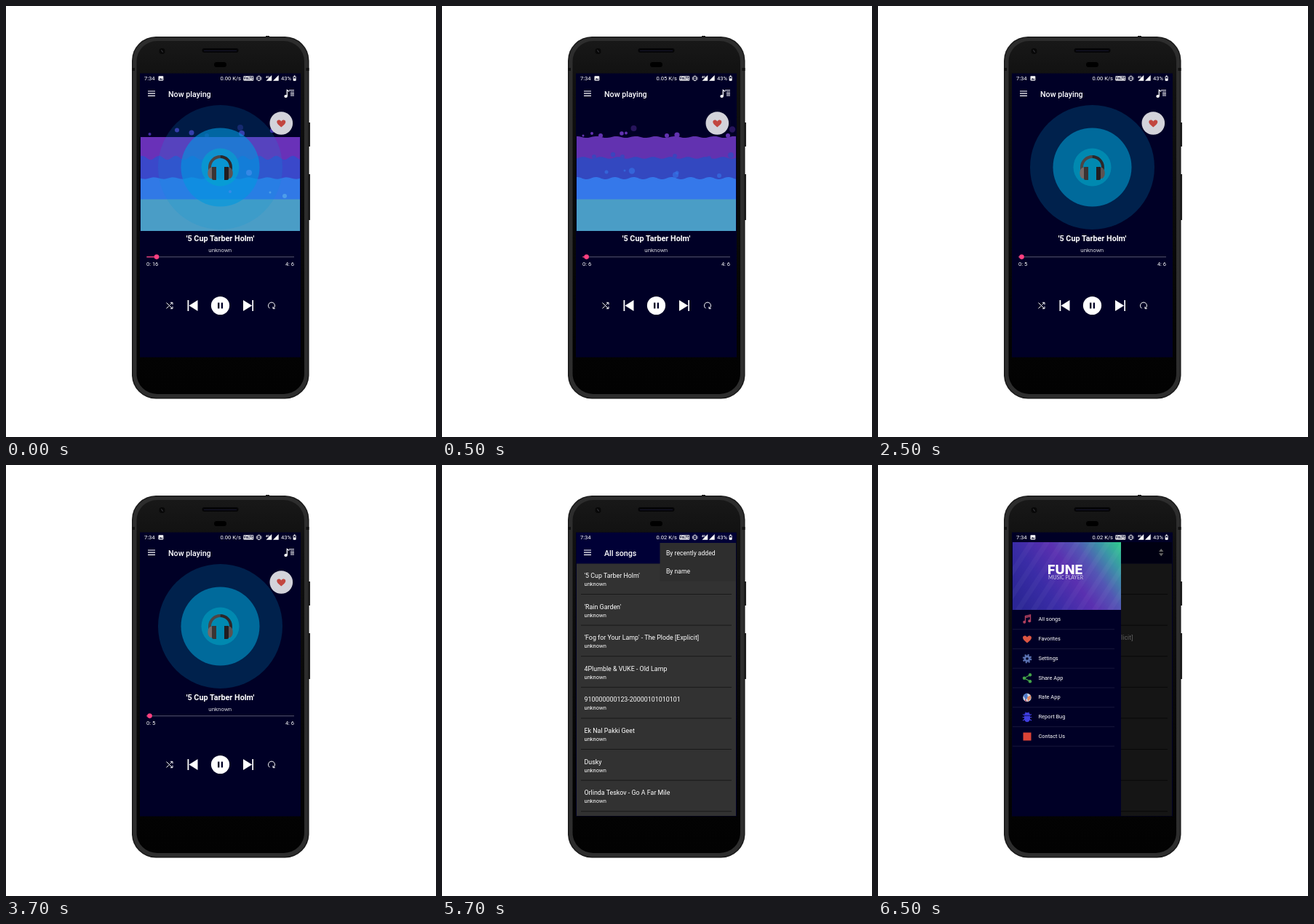
Recreate the animation shown at these times as an HTML page. Size 591 by 592 pixels, loop 8 s.

```html
<!DOCTYPE html>
<html lang="en">
<head>
<meta charset="utf-8">
<title>Music player</title>
<style>
html, body { margin: 0; width: 100%; height: 100%; overflow: hidden; background: #fff; }
svg { display: block; width: 100vw; height: 100vh; }
text { font-family: Roboto, "Open Sans", sans-serif; fill: #fff; }
.status { font-size: 7.6px; }
.bar { font-size: 10.7px; font-weight: 500; }
.song { font-size: 8.9px; }
.sub { font-size: 7.5px; }
.menu { font-size: 8.6px; }
.item { font-size: 7.45px; }
.mid { text-anchor: middle; }
.end { text-anchor: end; }
.line { fill: none; stroke: #fff; }

/* hard cuts between the screens */
.cut { animation: 8s step-end infinite; }
.ghost { animation-name: ghost; }
.waves { animation-name: waves; }
.rings { animation-name: rings; }
.player { animation-name: player; }
.blend { animation-name: blend; }
.list { animation-name: list; }
.drawer { animation-name: drawer; }
.photo { animation-name: photo; }
.browse { animation-name: browse; }
@keyframes ghost { 0% { opacity: 1 } 6.25%, 100% { opacity: 0 } }
@keyframes waves { 0% { opacity: 0 } 6.25% { opacity: 1 } 31.25%, 100% { opacity: 0 } }
@keyframes rings { 0% { opacity: 0 } 31.25% { opacity: 1 } 56.25%, 100% { opacity: 0 } }
@keyframes blend { 0% { opacity: 1 } 6.25% { opacity: 0 } 31.25% { opacity: 1 } 56.25%, 100% { opacity: 0 } }
@keyframes player { 0% { opacity: 1 } 56.25%, 100% { opacity: 0 } }
@keyframes list { 0% { opacity: 0 } 56.25% { opacity: 1 } 81.25%, 100% { opacity: 0 } }
@keyframes drawer { 0% { opacity: 0 } 81.25%, 100% { opacity: 1 } }
@keyframes browse { 0% { opacity: 0 } 56.25%, 100% { opacity: 1 } }
@keyframes photo { 0% { opacity: 1 } 56.25% { opacity: 0 } 81.25%, 100% { opacity: 1 } }
</style>
</head>
<body>
<svg viewBox="0 0 591 592" preserveAspectRatio="none">
  <defs>
    <linearGradient id="bezel" x2="0" y2="1">
      <stop stop-color="#181818"/><stop offset=".12" stop-color="#101010"/>
      <stop offset=".85" stop-color="#030303"/><stop offset="1" stop-color="#020202"/>
    </linearGradient>
    <linearGradient id="cover" gradientUnits="userSpaceOnUse" x1="200" y1="199" x2="334" y2="106">
      <stop stop-color="#2b2695"/><stop offset=".25" stop-color="#3a2ca6"/>
      <stop offset=".5" stop-color="#5a30b0"/><stop offset=".68" stop-color="#5356b4"/>
      <stop offset=".84" stop-color="#3c93a8"/><stop offset="1" stop-color="#2fcd8c"/>
    </linearGradient>
    <clipPath id="screen"><path d="M185 93h219v389h-219z"/></clipPath>
    <clipPath id="art"><path d="M185 135h219v174h-219z"/></clipPath>
    <clipPath id="head"><path d="M185 106h149v93h-149z"/></clipPath>
    <path id="heart" d="M0 5C-4 1.800-6-.2-6-2.200-6-5.300-2-6 0-3 2-6 6-5.300 6-2.200 6-.2 4 1.800 0 5z"/>
    <path id="burger" d="M195 117h10M195 120.200h10M195 123.400h10" stroke="#fff" stroke-width="1.200"/>
    <g id="phones">
      <path d="M280 226v-5a14.500 14.500 0 0 1 14.500-14" fill="none" stroke="#4d4545" stroke-width="4"/>
      <path d="M309 226v-5a14.500 14.500 0 0 0-14.500-14" fill="none" stroke="#2c2729" stroke-width="4"/>
      <path d="M283 222h-2c-5 2-5 13 0 15h2z" fill="#766967"/>
      <path d="M283 221h6v18h-4q-2 0-2-2z" fill="#3b3434"/>
      <path d="M306 222h2c5 2 5 13 0 15h-2z" fill="#5c5251"/>
      <path d="M300 221h6v16q0 2-2 2h-4z" fill="#211d20"/>
    </g>
  </defs>

  <!-- phone -->
  <path d="M414 160h4v33h-4zM414 231h4v63h-4z" fill="#202020"/>
  <path d="M357 41h5v3h-5z" fill="#111"/>
  <rect x="173" y="42" width="243.500" height="497.500" rx="33" fill="#191919"/>
  <rect x="174.500" y="43.500" width="240.500" height="494.500" rx="31.500" fill="#2d2d2d"/>
  <rect x="179.500" y="48" width="230.500" height="485" rx="28" fill="url(#bezel)"/>
  <path d="M173 87h4M412.500 87h4" stroke="#111" stroke-width="4"/>
  <rect x="269.500" y="58" width="50" height="6" rx="3" fill="#050507"/>
  <path d="M272 61.500h45" stroke="#15152a"/>
  <rect x="286" y="77" width="17" height="7" rx="3.500" fill="#000"/>
  <circle cx="214.500" cy="62" r="4" fill="#080808"/>
  <path d="M213.500 60.500l2 3" stroke="#44444a"/>
  <path d="M184 92.500h221v390h-221z" fill="#000026"/>

  <g clip-path="url(#screen)">
    <g class="cut player">
      <use href="#burger"/>
      <text class="bar" x="223" y="124.500">Now playing</text>
      <path class="line" d="M389 115.800h7M391 118.200h5M391 120.600h5M391 123h5" stroke-width="1.100"/>
      <path class="line" d="M386.300 124v-8.500l3 2" stroke-width="1.300"/>
      <ellipse cx="384.600" cy="124" rx="2.300" ry="1.900" fill="#fff"/>

      <g clip-path="url(#art)">
        <g class="cut ghost" id="ghost"></g>
        <g class="cut waves" id="waves"></g>
        <g class="cut rings">
          <circle cx="294.500" cy="221.500" r="85.500" fill="#00214c"/>
          <circle cx="294.500" cy="221.500" r="54" fill="#006a9b"/>
          <circle cx="294.500" cy="221.500" r="26" fill="#0089b0"/>
        </g>
        <use href="#phones" class="cut blend"/>
      </g>

      <circle cx="378.300" cy="161" r="15.800" fill="#d3d3da"/>
      <use href="#heart" x="378.300" y="161.500" fill="#c2463f"/>

      <text class="mid" x="294.500" y="323.300" font-size="10.800" font-weight="700">'5 Cup Tarber Holm'</text>
      <text class="mid" x="294.300" y="337.500" font-size="7.900" fill-opacity=".85">unknown</text>
      <path d="M193 344.600h203" stroke="#46465f" stroke-width="1.200"/>
      <g id="seek"></g>
      <text class="end sub" x="396" y="357.300">4: 6</text>

      <path class="line" d="M220.500 407.500l8 8M220.500 415.500l3.300-3.300M225.500 410.500l3-3M226 407.300h3v3M226 415.700h3v-3"/>
      <path d="M249.500 404h1.800v15h-1.800zM263.500 404v15l-12-7.500z" fill="#fff"/>
      <path d="M338.300 404h1.700v15h-1.700zM326 404v15l12.200-7.500z" fill="#fff"/>
      <circle cx="294.500" cy="411.500" r="12.600" fill="#fff"/>
      <path d="M291 407.500h2.400v8H291zM295.700 407.500h2.400v8h-2.400z" fill="#000026"/>
      <path class="line" d="M362.500 415.300a4.500 4.500 0 1 1 5 0M367 413v2.700h2.700"/>
    </g>

    <g class="cut list">
      <path d="M185 93h219v42.500h-219z" fill="#000036"/>
      <path d="M185 135.500h219v347h-219z" fill="#323232"/>
      <use href="#burger"/>
      <text class="bar" x="223" y="124.500">All songs</text>
      <g id="songs"></g>
      <path d="M299.500 107h105v52.500h-105z" fill="#2e2e2e"/>
      <text class="menu" x="308" y="123.500">By recently added</text>
      <text class="menu" x="308" y="149">By name</text>
    </g>

    <g class="cut drawer">
      <path d="M334 106h70v29.500h-70z" fill="#000012"/>
      <path d="M334 135.500h70v347h-70z" fill="#151515"/>
      <path d="M386 119l3.200-4 3.200 4zM386 121.200l3.200 4 3.200-4z" fill="#666"/>
      <text class="song" x="350.500" y="240.300" text-anchor="end" style="fill:#606060">[Explicit]</text>
      <g id="dim"></g>
      <path d="M185 106h149v376.500h-149z" fill="#000026"/>
      <g clip-path="url(#head)">
        <path d="M185 106h149v93h-149z" fill="url(#cover)"/>
        <g id="rays" stroke="#fff" stroke-opacity=".035" stroke-width="7"></g>
      </g>
      <text x="233" y="149.500" style="font:800 18px Inter,sans-serif" >FUNE</text>
      <text x="234" y="157.300" style="font:6.900px Lato,sans-serif;fill:#cfcbe8">MUSIC PLAYER</text>
      <g id="items"></g>
      <!-- notes -->
      <path d="M202.500 215.500v-8l7-1.700v8M202.500 209.500l7-1.700" fill="none" stroke="#b2405f" stroke-width="1.400"/>
      <circle cx="201.200" cy="215.700" r="2" fill="#b2405f"/>
      <circle cx="208.200" cy="214.200" r="2" fill="#b2405f"/>
      <use href="#heart" x="205" y="239.500" fill="#db5542"/>
      <!-- gear -->
      <circle cx="205" cy="266" r="5" fill="none" stroke="#5b72b2" stroke-width="2.600" stroke-dasharray="1.960 1.967"/>
      <circle cx="205" cy="266" r="3.200" fill="none" stroke="#5b72b2" stroke-width="2.800"/>
      <!-- share -->
      <path d="M209 288.500l-8 4.300 8 4.300" fill="none" stroke="#45a649" stroke-width="1.300"/>
      <g fill="#45a649"><circle cx="209" cy="288.300" r="2.200"/><circle cx="201" cy="292.800" r="2.200"/><circle cx="209" cy="297.300" r="2.200"/></g>
      <!-- rate -->
      <circle cx="205" cy="319.500" r="5.700" fill="#c9d5e6"/>
      <path d="M200 317a6 6 0 0 1 5-3.500l1 6-3 3z" fill="#4f79c7"/>
      <path d="M205 319l5-3v5l-4 4z" fill="#e58b62"/>
      <path d="M202 321l3 4-3-1z" fill="#c34a5c"/>
      <!-- bug -->
      <path d="M199 342.500l3 1.500M198.700 346.500h3M199 351l3-2M211 342.500l-3 1.500M211.300 346.500h-3M211 351l-3-2M202.500 339.500l1.500 2M207.500 339.500l-1.500 2" stroke="#403ee0" stroke-width="1.200"/>
      <path d="M201 343.500a4 3.500 0 0 1 8 0v5a4 4.500 0 0 1-8 0z" fill="#403ee0"/>
      <path d="M201 344.300h8" stroke="#000026" stroke-width=".7"/>
      <rect x="199.500" y="367.500" width="11" height="11" fill="#db4437"/>
    </g>

    <!-- status bar -->
    <g class="status">
      <text x="190" y="102.300">7:34</text>
      <g class="cut photo">
        <rect x="209.500" y="96.300" width="6.800" height="6.200" rx=".8" fill="#fff"/>
        <path d="M210.500 101.300l1.700-2.300 1.200 1.400 1-1 1.300 1.900z" fill="#000026"/>
      </g>
      <text class="cut blend" x="294.500" y="102.300">0.00 K/s</text>
      <text class="cut waves" x="294.500" y="102.300">0.05 K/s</text>
      <text class="cut browse" x="294.500" y="102.300">0.02 K/s</text>
      <rect x="326.300" y="96.300" width="14" height="6.200" rx=".8" fill="#fff"/>
      <text class="mid" x="333.300" y="101.200" style="font-size:4.700px;font-weight:700;fill:#000026">VoLTE</text>
      <rect class="line" x="346" y="96.300" width="3.200" height="6.200" rx=".6"/>
      <path class="line" d="M344.300 97.500v4M350.900 97.500v4" stroke-width=".8"/>
      <path d="M357.500 102.700h7.700V95zM367 102.700h7.700V95z" fill="#fff"/>
      <text x="357" y="98.700" style="font-size:4px;font-weight:700">4G</text>
      <text x="378" y="102.300">43%</text>
      <path class="line" d="M395 97h3.200v5.300H395z" stroke-width=".8"/>
      <path d="M395.800 95.500h1.600v1.500h-1.600zM395 99.500h3.200v3H395z" fill="#fff"/>
    </g>
  </g>
</svg>
<script>
const put = (id, html) => { document.getElementById(id).innerHTML += html; };
const dot = (x, y, r, fill, alpha = 1) =>
  `<circle cx="${x}" cy="${y}" r="${r}" fill="${fill}" fill-opacity="${alpha}"/>`;

// One filled band with a rippled top edge
function band(y, fill, amp, period, shift) {
  let d = "M185 310";
  for (let x = 185; x <= 405; x += 2)
    d += `L${x} ${(y + amp * Math.sin((x - shift) / period * 2 * Math.PI)).toFixed(1)}`;
  return `<path d="${d}V310z" fill="${fill}"/>`;
}
const bubbles = (fill, alpha, spots) => spots.map(s => dot(...s, fill, alpha)).join("");

put("waves",
  bubbles("#6232b0", 1, [[194, 178, 1.5], [206, 175, 2], [218, 178, 3], [247, 175, 2.8], [253, 174.5, 2], [323, 177, 3.6], [309, 178, 3], [393, 178, 3]]) +
  bubbles("#6232b0", .4, [[263.5, 168, 4], [399, 169.5, 4.2], [379, 171, 1.5]]) +
  band(180, "#6232b0", 1.1, 27, 3) +
  bubbles("#3348c0", .8, [[209, 207, 3], [235, 204, 3.2], [248, 207, 3], [320, 206, 3], [367, 209, 3], [397, 205, 4]]) +
  band(208.5, "#3348c0", 1.3, 24, 8) +
  bubbles("#3578ea", .6, [[226, 228, 2.5], [251, 226, 1.5], [261, 226.500, 4.2], [321, 232, 4], [323, 229, 2.5], [381, 233, 3]]) +
  band(236.5, "#3578ea", 1.5, 26, 10) +
  band(265.5, "#4a9dc6", 0, 27, 0));

const rings = [[85.5, "#0096d8", .18], [54, "#0098e0", .6], [26, "#00a9cc", .55]];
put("ghost",
  bubbles("#4b35b8", .85, [[197.5, 176, 2], [235, 170.5, 3], [255, 174, 3.5], [324, 175, 4], [366, 171, 3.2]]) +
  bubbles("#4b35b8", .35, [[322, 167, 4], [276, 178, 3]]) +
  band(180, "#6931b8", 0, 27, 0) +
  band(208.5, "#3a48ca", 2.8, 23, 9) +
  band(236.5, "#3179e6", 1.2, 26, 2) +
  band(265.5, "#4a9dc6", 0, 27, 0) +
  rings.map(([r, fill, a]) => dot(294.5, 221.5, r, fill, a)).join("") +
  bubbles("#3f8be8", .8, [[334, 229, 4], [308, 255, 2]]) +
  bubbles("#58a9ea", .75, [[383, 261, 3], [363, 256, 1.5]]));

const seek = (name, x, time) => `<g class="cut ${name}">
  <path d="M193.500 344.600H${x}" stroke="#ff4081" stroke-width="1.300"/>
  ${dot(x, 344.6, 3.3, "#ff4081")}<text class="sub" x="193" y="357.300">${time}</text></g>`;
put("seek", seek("ghost", 207, "0: 16") + seek("waves", 198.6, "0: 6") + seek("rings", 197.5, "0: 5"));

const songs = ["'5 Cup Tarber Holm'", "'Rain Garden'", "'Fog for Your Lamp' - The Plode [Explicit]",
  "4Plumble &amp; VUKE - Old Lamp", "910000000123-20000101010101", "Ek Nal Pakki Geet",
  "Dusky", "Orlinda Teskov - Go A Far Mile"];
const rule = (x1, x2, y, color) => `<path d="M${x1} ${y}H${x2}" stroke="${color}"/>`;
songs.forEach((name, i) => {
  const y = i * 42.6;
  put("songs", `<text class="song" x="195.500" y="${155 + y}">${name}</text>
    <text class="sub" x="195.500" y="${166 + y}">unknown</text>` + rule(191, 398, 177.5 + y, "#191919"));
  put("dim", rule(334, 398, 177.5 + y, "#080808"));
});

["All songs", "Favorites", "Settings", "Share App", "Rate App", "Report Bug", "Contact Us"].forEach((name, i) => {
  const y = i * 26.75;
  put("items", `<text class="item" x="220.500" y="${214.3 + y}">${name}</text>` + rule(185, 325, 225.7 + y, "#17173b"));
});

for (let x = 150; x < 340; x += 21) put("rays", `<path d="M${x} 200l62-95"/>`);
</script>
</body>
</html>
```
